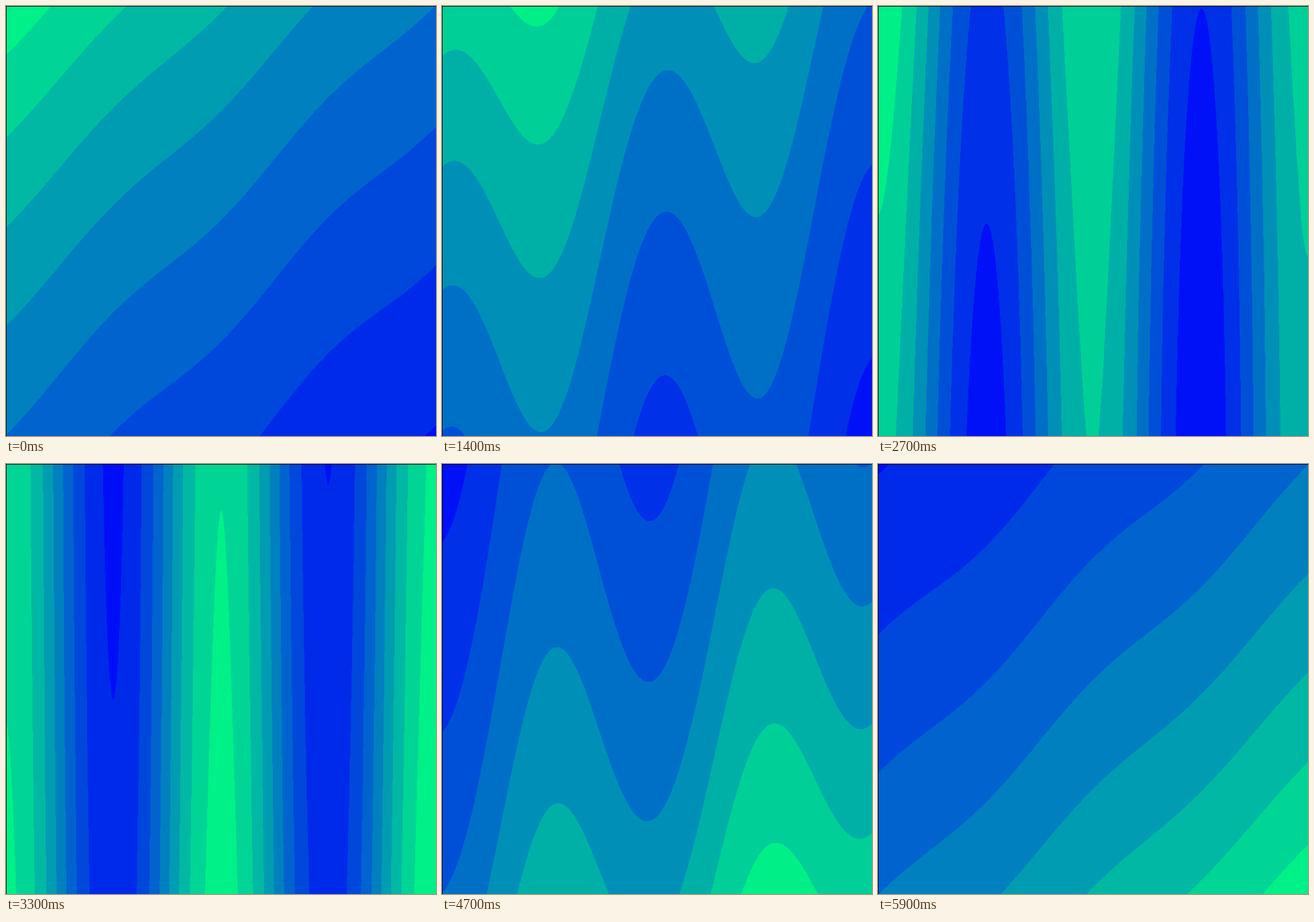
Animation of 748x748 px, one loop 6000 ms. Source, as an HTML page with a canvas:

```html
<!DOCTYPE html>
<html lang="en">
<head>
<meta charset="utf-8">
<title>Contours</title>
<style>
  html, body { margin: 0; width: 100%; height: 100%; overflow: hidden; background: #000; }
  canvas { display: block; }
</style>
</head>
<body>
<canvas id="stage" width="748" height="748"></canvas>
<script>
const SIZE = 748, STEPS = 60, STEP_MS = 100, SPAN = 4 * Math.PI, MAX_BINS = 8;
const NICE = [1, 1.5, 2, 2.5, 3, 4, 5, 6, 8, 10];

const ctx = document.getElementById("stage").getContext("2d");
const image = ctx.createImageData(SIZE, SIZE);
const pixels = new Uint32Array(image.data.buffer);
const field = new Float64Array(SIZE * SIZE);
const slope = new Float64Array(2 * SIZE);
const wave = new Float64Array(SIZE);

const toCoord = i => (i + 0.5) / SIZE * SPAN - SPAN / 2;

// Smallest round interval that covers the range in at most MAX_BINS bins.
function niceStep(range) {
  const raw = range / MAX_BINS;
  const scale = 10 ** Math.floor(Math.log10(raw));
  return scale * NICE.find(n => n * scale >= raw * (1 - 1e-9));
}

// Blue to spring green, as a little-endian ABGR pixel.
function bandColor(i, count) {
  const g = Math.floor((i + 0.5) / count * 256);
  const b = Math.round(255 - g / 2);
  return (255 << 24 | b << 16 | g << 8) >>> 0;
}

// u = cosh(z + (x + y) / 30) + 2 (sin z + cos z) cos x
function computeField(z) {
  const amp = 2 * (Math.sin(z) + Math.cos(z));
  for (let s = 0; s < 2 * SIZE; s++) {
    slope[s] = Math.cosh(z + ((s + 1) / SIZE - 1) * SPAN / 30);
  }
  for (let x = 0; x < SIZE; x++) wave[x] = amp * Math.cos(toCoord(x));

  let min = Infinity, max = -Infinity;
  for (let y = 0, p = 0; y < SIZE; y++) {
    for (let x = 0; x < SIZE; x++, p++) {
      const u = field[p] = slope[x + y] + wave[x];
      if (u < min) min = u;
      if (u > max) max = u;
    }
  }
  return [min, max];
}

function draw(step) {
  const [min, max] = computeField(-SPAN / 2 + SPAN * step / (STEPS - 1));
  const interval = niceStep(max - min);
  const low = Math.floor(min / interval);
  const count = Math.ceil(max / interval) - low;
  const colors = Array.from({ length: count }, (_, i) => bandColor(i, count));

  for (let p = 0; p < field.length; p++) {
    const band = Math.floor(field[p] / interval) - low;
    pixels[p] = colors[Math.min(band, count - 1)];
  }
  ctx.putImageData(image, 0, 0);
  ctx.fillStyle = "#000";
  ctx.fillRect(0, 0, SIZE, 1);
  ctx.fillRect(0, 0, 1, SIZE);
}

let start = null, shown = -1;
function tick(now) {
  if (start === null) start = now;
  const step = Math.floor(Math.max(0, now - start) / STEP_MS) % STEPS;
  if (step !== shown) draw(shown = step);
  requestAnimationFrame(tick);
}
requestAnimationFrame(tick);
</script>
</body>
</html>
```
